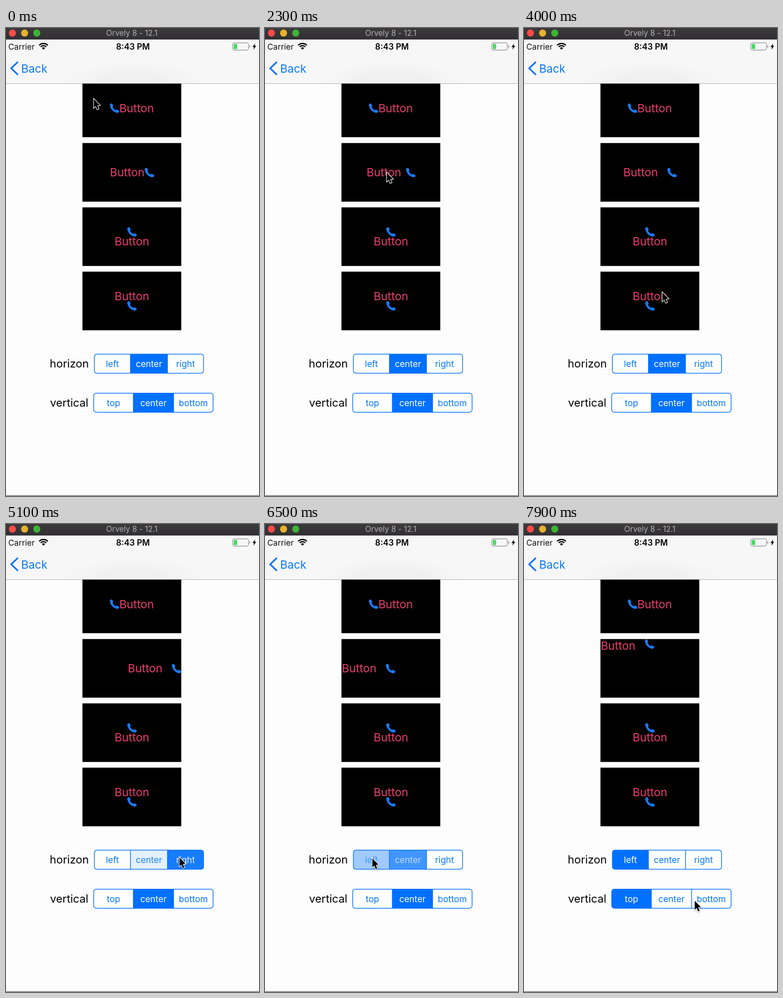
An HTML page with a canvas for the animation above (8 s loop, 551x1016 px).

```html
<!DOCTYPE html>
<html lang="en">
<head>
<meta charset="utf-8">
<title>Button alignment demo</title>
<style>
  html, body { margin: 0; width: 100%; height: 100%; overflow: hidden; background: #fefdfe; }
  canvas { display: block; width: 551px; height: 1016px; }
</style>
</head>
<body>
<canvas id="stage"></canvas>
<script>
const W = 551, H = 1016, LOOP = 8000, STEP = 100;
const BLUE = '#0070ff', PINK = '#e83b6d', PAPER = '#fefdfe';
const FONT = 'Inter, Roboto, sans-serif';

const canvas = document.getElementById('stage');
const ctx = canvas.getContext('2d');
const dpr = window.devicePixelRatio || 1;
canvas.width = W * dpr;
canvas.height = H * dpr;

const clamp = (v, lo, hi) => Math.max(lo, Math.min(hi, v));
const lerp = (a, b, k) => a + (b - a) * k;
const smooth = k => k * k * (3 - 2 * k);
const easeIn = k => k * k;
const easeOut = k => 1 - (1 - k) * (1 - k);

// Pointer stops: time, x, y, easing used to get there
const POINTER = [
  [0, 190.5, 153],
  [100, 190.5, 153, smooth],
  [850, 264.5, 313, smooth],
  [3550, 264.5, 313, smooth],
  [4000, 300.5, 573, easeIn],
  [4650, 377, 723, easeOut],
  [5200, 377, 723, smooth],
  [6200, 233, 725, smooth],
  [6600, 233, 725, smooth],
  [7100, 231, 812, smooth],
  [7400, 231, 812, smooth],
  [7900, 371, 817, smooth]
];

// Selections: time of the fade, from, to
const HORIZONTAL = [[4860, 1, 2], [6400, 1, 0]];
const VERTICAL = [[7260, 1, 0]];
const FADE = 300, PRESS = 100;

function text(str, x, y, size, color, align = 'left', weight = 400) {
  ctx.font = `${weight} ${size}px ${FONT}`;
  ctx.textAlign = align;
  ctx.fillStyle = color;
  ctx.fillText(str, x, y);
}

function rect(x, y, w, h, color) {
  ctx.fillStyle = color;
  ctx.fillRect(x, y, w, h);
}

function disc(x, y, r, color) {
  ctx.fillStyle = color;
  ctx.beginPath();
  ctx.arc(x, y, r, 0, Math.PI * 2);
  ctx.fill();
}

function line(points, color, width) {
  ctx.strokeStyle = color;
  ctx.lineWidth = width;
  ctx.beginPath();
  points.forEach(([x, y]) => ctx.lineTo(x, y));
  ctx.stroke();
}

function polygon(points) {
  ctx.beginPath();
  points.forEach(([x, y]) => ctx.lineTo(x, y));
  ctx.closePath();
}

function roundBox(x, y, w, h, r) {
  ctx.beginPath();
  ctx.roundRect(x, y, w, h, r);
}

function titleBar() {
  const g = ctx.createLinearGradient(0, 0, 0, 25);
  g.addColorStop(0, '#3c3a3d');
  g.addColorStop(1, '#313033');
  rect(0, 0, W, 25, g);
  ['#fc4b47', '#e5b22b', '#3eb437'].forEach((c, i) => disc(14 + i * 26.5, 11, 7.7, c));
  text('Orvely 8 - 12.1', 274, 17, 16.8, '#b3b2b4', 'center');
}

function wifi(x, y) {
  const a = -Math.PI * 0.75, b = -Math.PI * 0.25;
  ctx.fillStyle = ctx.strokeStyle = '#000';
  ctx.beginPath();
  ctx.moveTo(x, y);
  ctx.arc(x, y, 5, a, b);
  ctx.fill();
  ctx.lineWidth = 2.7;
  for (const r of [8.6, 13.4]) {
    ctx.beginPath();
    ctx.arc(x, y, r, a, b);
    ctx.stroke();
  }
}

function battery() {
  ctx.strokeStyle = '#96959a';
  ctx.lineWidth = 1.4;
  roundBox(493.7, 32.2, 34.5, 15.8, 4.2);
  ctx.stroke();
  ctx.fillStyle = '#4bd763';
  roundBox(496, 34.4, 7.4, 11.4, 1.6);
  ctx.fill();
  ctx.fillStyle = '#96959a';
  roundBox(529.8, 37.5, 2, 5.2, [0, 2, 2, 0]);
  ctx.fill();
  polygon([[542.8, 33.5], [536.8, 41.3], [540.2, 41.3], [538.8, 47], [545, 38.8], [541.5, 38.8]]);
  ctx.fillStyle = '#000';
  ctx.fill();
}

function navBar() {
  rect(0, 25, W, 95, '#f8f7f8');
  // Soft shade of the content blurred behind the bar
  ctx.save();
  ctx.beginPath();
  ctx.rect(0, 25, W, 95);
  ctx.clip();
  ctx.translate(276, 112);
  ctx.scale(1, 0.25);
  const g = ctx.createRadialGradient(0, 0, 60, 0, 0, 150);
  g.addColorStop(0, 'rgba(0,0,0,0.026)');
  g.addColorStop(1, 'rgba(0,0,0,0)');
  rect(-160, -160, 320, 320, g);
  ctx.restore();
  rect(0, 120, W, 1.2, '#b4b3b6');

  text('Carrier', 5, 46.6, 17.6, '#111');
  wifi(81.7, 47);
  text('8:43 PM', 276.5, 46.6, 18, '#000', 'center', 600);
  battery();
  line([[26, 73.5], [11.2, 87.5], [26, 101.5]], BLUE, 3.4);
  text('Back', 33, 96.5, 24.5, '#0a78ff');
}

function handset(x, y) {
  ctx.save();
  ctx.translate(x, y);
  ctx.fillStyle = '#1a7bfb';
  ctx.fill(new Path2D(
    'M-10.5-6.5Q-10.5-9-7-10Q-5.5-10.5-4.5-8.5L-3-5.5Q-2.6-4-4.5-3' +
    'Q-3 1.5 2.5 4.5Q4 2.5 5.5 3L9.5 5.5Q11 6.5 10 8Q8 10.8 5 10.3Q-8 7-10.5-6.5Z'));
  ctx.restore();
}

function tile(y, h, label, icon) {
  ctx.save();
  ctx.beginPath();
  ctx.rect(166.5, y, 215.2, h);
  ctx.clip();
  rect(166, y, 217, h, '#000');
  text('Button', label[0], label[1], 24.5, PINK, 'center');
  handset(icon[0], icon[1]);
  ctx.restore();
}

function tiles(t) {
  const clicks = clamp(Math.floor((t - 900) / 290) + 1, 0, 10);
  const shift = t >= 6400 ? -49 : t >= 4860 ? 49 : 0;
  const top = t >= 7260;
  tile(120.5, 116.8, [284.5, 182.5], [236.5, 174]);
  tile(249.5, 127.6,
    [264 - clicks + shift, top ? 273.3 : 322.3],
    [312.5 + clicks + shift, top ? 260.5 : 313.7]);
  tile(389.2, 127.6, [274.2, 472.3], [274.4, 442.5]);
  tile(528.7, 127.8, [274.2, 591.3], [274.4, 603.3]);
}

// Fill strength and label whiteness of segment i
function segmentState(i, t, changes) {
  const now = changes.filter(c => t >= c[0] - PRESS).pop();
  if (!now) return i === 1 ? [1, 1] : [0, 0];
  const [start, from, to] = now;
  const p = smooth(clamp((t - start) / FADE, 0, 1));
  if (i === to) return [lerp(0.15, 1, p), p];
  // The middle segment doubles as the stand-in for the previous choice
  const previous = changes[changes.indexOf(now) - 1];
  const source = previous ? previous[2] : from;
  return i === (now.source ?? source) ? [1 - p, 1 - p] : [0, 0];
}

function segments(edges, y, labels, t, changes) {
  const x = edges[0], w = edges[3] - x, h = 41.5;
  ctx.save();
  roundBox(x, y, w, h, 5.5);
  ctx.clip();
  rect(x, y, w, h, '#fff');
  labels.forEach((label, i) => {
    const [fill, white] = segmentState(i, t, changes);
    const a = edges[i], b = edges[i + 1], mid = (a + b) / 2;
    ctx.globalAlpha = fill;
    rect(a, y, b - a, h, BLUE);
    ctx.globalAlpha = 1;
    const c = `rgb(${255 * white}, ${lerp(120, 255, white)}, 255)`;
    text(label, mid, y + 27.8, 19, c, 'center');
  });
  ctx.restore();
  ctx.strokeStyle = BLUE;
  ctx.lineWidth = 1.5;
  roundBox(x, y, w, h, 5.5);
  ctx.stroke();
  for (const d of edges.slice(1, 3)) line([[d, y], [d, y + h]], BLUE, 1.5);
}

function pointer(t) {
  let i = POINTER.findIndex(p => p[0] > t);
  if (i < 0) i = POINTER.length - 1;
  const [t0, x0, y0] = POINTER[i - 1], [t1, x1, y1, ease] = POINTER[i];
  const k = ease(clamp((t - t0) / (t1 - t0), 0, 1));
  ctx.save();
  ctx.translate(lerp(x0, x1, k), lerp(y0, y1, k));
  polygon([[0.8, 1], [0.8, 20.3], [5, 16.4], [8.2, 23.9], [11.4, 22.5], [8.3, 15.3], [14, 14.6]]);
  ctx.shadowColor = 'rgba(0,0,0,0.35)';
  ctx.shadowBlur = 3 * dpr;
  ctx.shadowOffsetY = 1.5 * dpr;
  ctx.strokeStyle = '#fff';
  ctx.lineWidth = 2.4;
  ctx.stroke();
  ctx.shadowColor = 'transparent';
  ctx.fillStyle = '#000';
  ctx.fill();
  ctx.restore();
}

// The right choice returns to the middle before the left one is picked
HORIZONTAL[1].source = 1;
HORIZONTAL.splice(1, 0, [5800, 2, 1]);

function draw(t) {
  ctx.setTransform(dpr, 0, 0, dpr, 0, 0);
  rect(0, 0, W, H, PAPER);
  titleBar();
  navBar();
  tiles(t);
  text('horizon', 95.3, 737.3, 24, '#000');
  segments([192.5, 271, 351.7, 430.3], 708, ['left', 'center', 'right'], t, HORIZONTAL);
  text('vertical', 96, 822.3, 24, '#000');
  segments([191, 277.3, 365, 451], 792.7, ['top', 'center', 'bottom'], t, VERTICAL);
  rect(0, 1015, W, 1, '#2a2a2c');
  pointer(t);
}

function frame() {
  const t = performance.now() % LOOP;
  draw(Math.floor(t / STEP) * STEP);
  requestAnimationFrame(frame);
}
requestAnimationFrame(frame);
</script>
</body>
</html>
```
